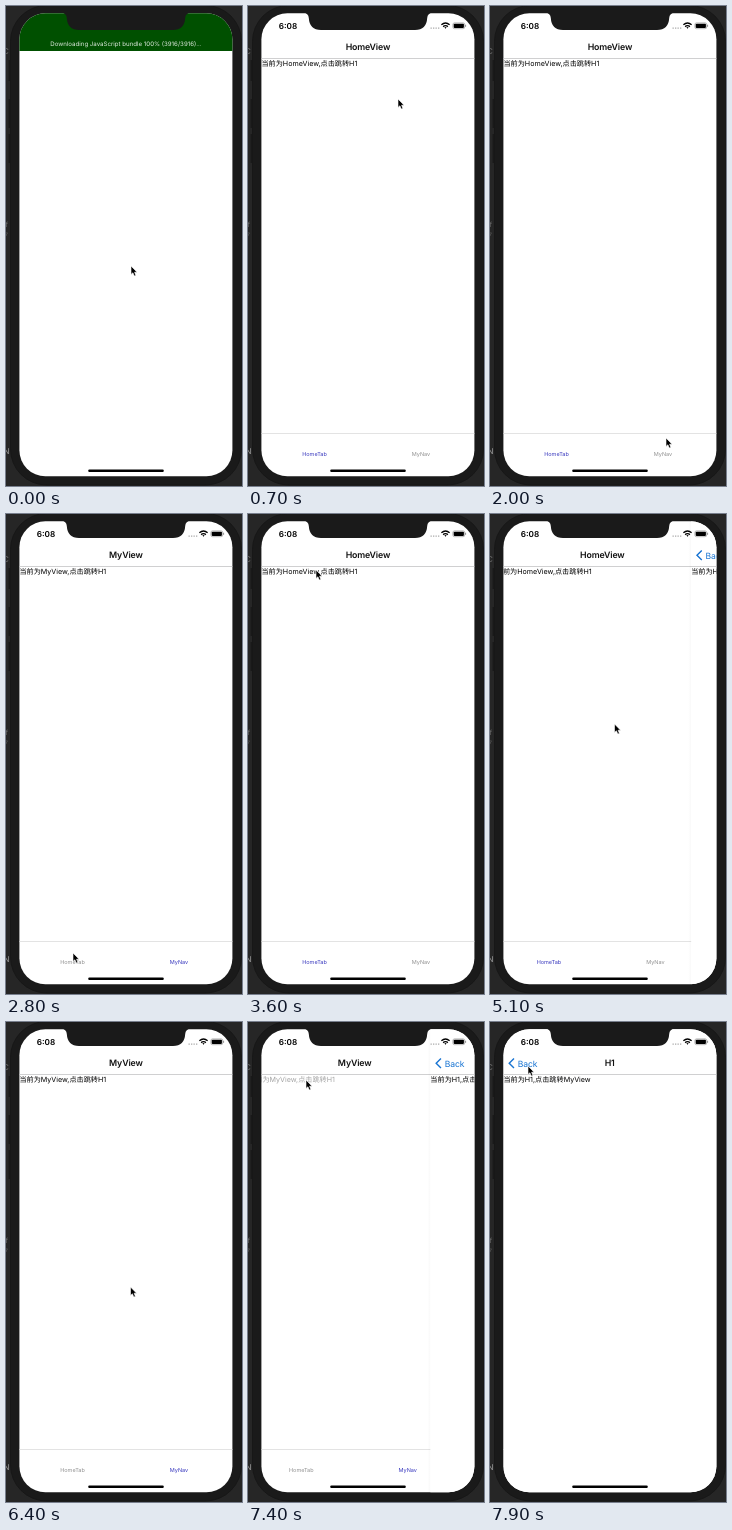
Recreate the animation shown at these times as an HTML page. Size 236 by 480 pixels, loop 8 s.

```html
<!DOCTYPE html>
<html lang="zh">
<head>
<meta charset="utf-8">
<title>Tab and stack navigation</title>
<style>
  html, body { margin: 0; width: 100%; height: 100%; overflow: hidden; background: #262626; }
  svg { display: block; width: 100vw; height: 100vh; }
  text {
    font-family: Inter, "Noto Sans CJK SC", "Noto Sans CJK", sans-serif;
    text-rendering: geometricPrecision;
  }
  .title { font-size: 8.8px; font-weight: 600; letter-spacing: -.15px; text-anchor: middle; fill: #111; }
  .body { font-size: 7.15px; fill: #000; }
  .tab { font-size: 5.5px; text-anchor: middle; fill: #919191; }
  .tab.on { fill: #3a3abf; }
  .back { font-size: 8.6px; letter-spacing: -.1px; fill: #1874d2; }
  .clock { font-size: 8.2px; font-weight: 600; fill: #000; }
  .load { font-size: 6.13px; text-anchor: middle; fill: #dfeadf; }
  .behind { font-size: 8px; fill: #9a9a9a; }
</style>
</head>
<body>
<svg viewBox="0 0 236 480" preserveAspectRatio="none">
  <defs>
    <clipPath id="screen"><rect x="13.4" y="7.3" width="213" height="463" rx="26"/></clipPath>
    <clipPath id="edge"><rect width="3.5" height="480"/></clipPath>
    <linearGradient id="shade"><stop stop-opacity="0"/><stop offset="1" stop-opacity=".025"/></linearGradient>
  </defs>

  <!-- window behind and phone body -->
  <rect width="236" height="480" fill="#262626"/>
  <g class="behind" clip-path="url(#edge)">
    <text x="-3" y="48" opacity=".6">C</text>
    <text x="-.5" y="221" opacity=".6" font-size="7">f</text>
    <text x="-1.5" y="231" opacity=".5" font-size="6">7</text>
    <text x="-2.5" y="448">N</text>
  </g>
  <rect x="4.5" y="-.5" width="231" height="479.5" rx="36" fill="#1a1a1a" stroke="#171717"/>
  <path d="M3.2 54v21M3.2 93v29M3.2 128v29" stroke="#151515"/>

  <g clip-path="url(#screen)">
    <rect x="13" y="7" width="214" height="464" fill="#fff"/>

    <g id="tabs">
      <text class="title" id="heading" x="119.9" y="44.3">HomeView</text>
      <path d="M13 52.5h214" stroke="#c4c4c6" stroke-width=".8"/>
      <text class="body" x="13.4" y="59.7" id="link">当前为<tspan id="name">HomeView,</tspan>点击跳转H1</text>
      <path d="M13 427.5h214" stroke="#dcdcdc" stroke-width=".8"/>
      <text class="tab" id="homeTab" x="66.5" y="450.4">HomeTab</text>
      <text class="tab" id="myTab" x="173" y="450.4">MyNav</text>
    </g>

    <g id="card">
      <rect x="10.4" y="7" width="3" height="464" fill="url(#shade)"/>
      <rect x="13.4" y="7" width="214" height="464" fill="#fff"/>
      <path d="M24 36.6l-4.8 4.7 4.8 4.7" fill="none" stroke="#1874d2" stroke-width="1.4"/>
      <text class="back" x="27.7" y="44.6">Back</text>
      <text class="title" x="119.7" y="44.3">H1</text>
      <path d="M13 52.5h214" stroke="#c4c4c6" stroke-width=".8"/>
      <text class="body" x="13.4" y="59.7">当前为H1,点击跳转MyView</text>
    </g>

    <g id="status">
      <text class="clock" x="30.7" y="23">6:08</text>
      <path d="M182.5 22.2h9" stroke="#aaa" stroke-width="1.2" stroke-dasharray="1.3 1.2"/>
      <g fill="none" stroke="#000" stroke-width="1.4">
        <path d="M193.4 18.8q4.1-3.6 8.2 0"/>
        <path d="M195.1 20.6q2.4-2 4.8 0"/>
      </g>
      <path d="M196.4 21.5q1.1-.8 2.2 0l-1.1 1.2z"/>
      <rect x="204.9" y="16.9" width="11.8" height="5.8" rx="1.6" fill="none" stroke="#888" stroke-width=".6"/>
      <rect x="205.7" y="17.7" width="10.2" height="4.2" rx=".9"/>
      <path d="M217.6 18.8v2" stroke="#777" stroke-width=".8"/>
    </g>

    <g id="banner">
      <rect x="13" y="7" width="214" height="38" fill="#005000"/>
      <text class="load" x="119.9" y="40.2">Downloading JavaScript bundle 100% (3916/3916)...</text>
    </g>
    <rect x="82.2" y="463.6" width="75.6" height="2.5" rx="1.25"/>
  </g>

  <path d="M55 6.5Q60.5 7 60.8 12Q61.5 24 73 24H167Q178.5 24 179.2 12Q179.5 7 185 6.5Z" fill="#1a1a1a"/>

  <path id="cursor" d="M0 0V8.4L1.9 6.8L3.3 10L4.9 9.4L3.6 6.2H6.1Z" stroke="#fff" stroke-width=".6" stroke-linejoin="round"/>
</svg>

<script>
  const LOOP = 8000, TICK = 100, WIDTH = 213;
  const $ = id => document.getElementById(id);

  // time, x, y of the pointer tip
  const path = [
    [0, 125, 260], [300, 125, 260], [700, 150, 93], [800, 150, 93],
    [1300, 174, 436], [1700, 75, 439], [1900, 122, 384], [2000, 176, 432],
    [2200, 176, 432], [2800, 67, 439], [3000, 67, 439], [3600, 68, 56],
    [3900, 68, 56], [4300, 61, 86], [4600, 40, 45], [4900, 39, 44],
    [5100, 124.5, 210], [5500, 58, 438], [5600, 58, 438], [5800, 125, 375],
    [5900, 193, 420], [6000, 179, 434], [6200, 178, 434], [6400, 124.5, 265],
    [6900, 58, 58], [7500, 58, 58], [7900, 38, 44], [LOOP, 38, 44]
  ];

  const clamp = v => Math.min(1, Math.max(0, v));
  const ramp = (t, start, length) => clamp((t - start) / length);
  const bez = (a, b, s) => 3 * (1 - s) * (1 - s) * s * a + 3 * (1 - s) * s * s * b + s ** 3;

  // cubic-bezier(.2833, .99, .31833, .99)
  function ease(x) {
    if (x <= 0 || x >= 1) return clamp(x);
    let lo = 0, hi = 1;
    for (let i = 0; i < 24; i++) {
      const mid = (lo + hi) / 2;
      if (bez(.2833, .31833, mid) < x) lo = mid; else hi = mid;
    }
    return bez(.99, .99, lo);
  }

  const slide = (t, start) => ease(ramp(t, start, 500));
  const press = (t, down, up) => 1 - .8 * (ramp(t, down, 150) - ramp(t, up, 250));
  const move = (el, x, y = 0) => el.setAttribute("transform", `translate(${x} ${y})`);

  function pointer(t) {
    const i = path.findIndex(p => p[0] > t);
    const [t0, x0, y0] = path[i - 1], [t1, x1, y1] = path[i];
    const k = (t - t0) / (t1 - t0);
    return [x0 + (x1 - x0) * k, y0 + (y1 - y0) * k];
  }

  function draw(t) {
    const loaded = t >= 100;
    const my = (t >= 2200 && t < 3000) || t >= 6200;
    const pushed = slide(t, 3893) - slide(t, 4917) + slide(t, 7370);

    $("tabs").style.display = $("status").style.display = loaded ? "" : "none";
    $("banner").style.opacity = 1 - ramp(t, 50, 250);

    $("heading").textContent = my ? "MyView" : "HomeView";
    $("name").textContent = my ? "MyView," : "HomeView,";
    $("homeTab").classList.toggle("on", !my);
    $("myTab").classList.toggle("on", my);
    $("link").style.opacity = Math.min(press(t, 3750, 3900), press(t, 7050, 7350));

    move($("tabs"), -.3 * WIDTH * pushed);
    move($("card"), WIDTH * (1 - pushed));
    $("card").style.display = pushed > 0 ? "" : "none";
    move($("cursor"), ...pointer(t));
  }

  const begin = performance.now();
  function frame() {
    const t = (performance.now() - begin) % LOOP;
    draw(Math.floor(t / TICK) * TICK);
    requestAnimationFrame(frame);
  }
  frame();
</script>
</body>
</html>
```
